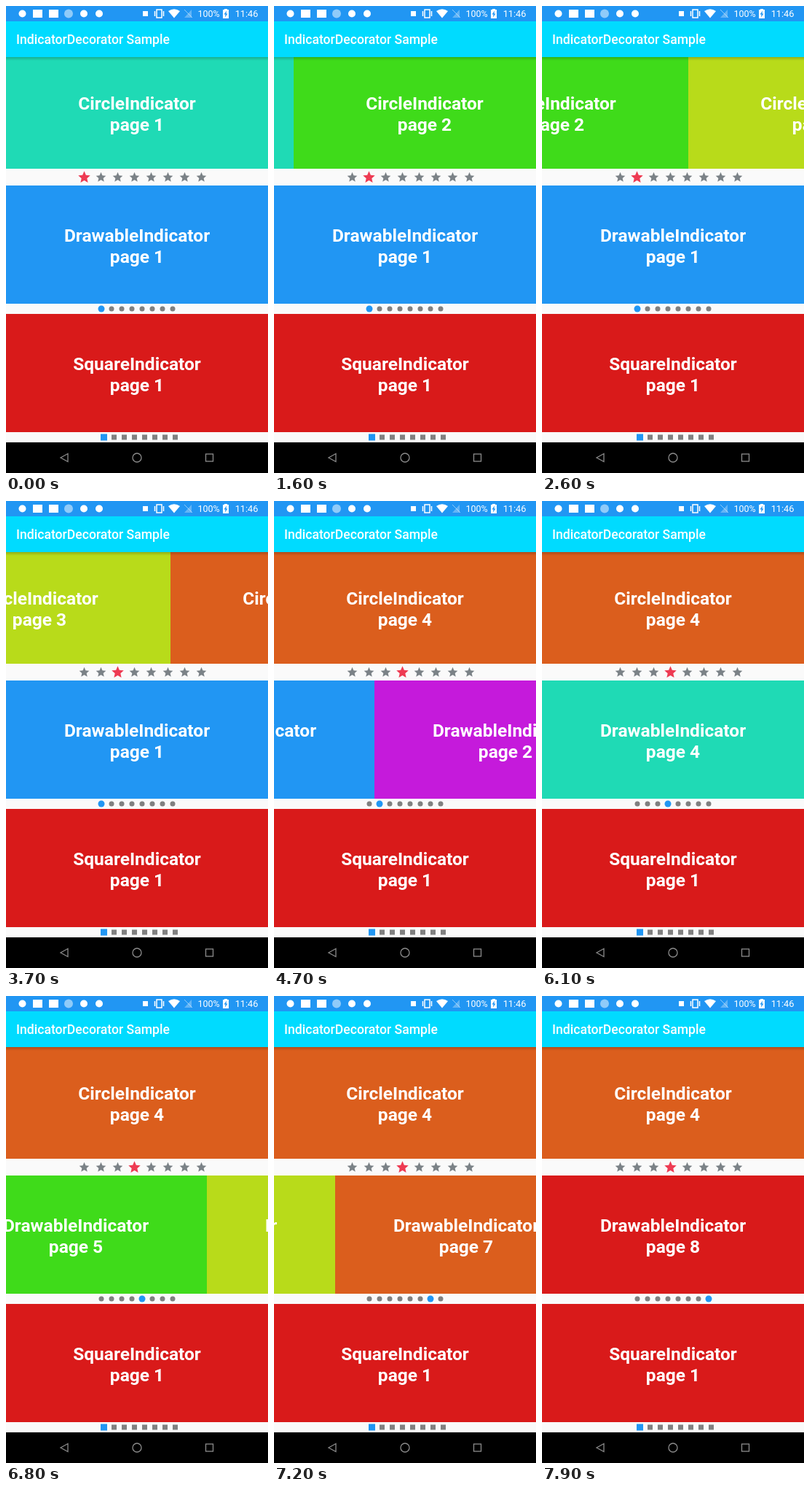
An HTML page with a canvas for the animation above (8000 ms loop, 360 by 640 pixels).

```html
<!DOCTYPE html>
<html lang="en">
<head>
<meta charset="utf-8">
<title>IndicatorDecorator Sample</title>
<style>
html, body { margin: 0; width: 100%; height: 100%; overflow: hidden; background: #000; }
canvas { display: block; }
</style>
</head>
<body>
<canvas id="stage" width="360" height="640"></canvas>
<script>
const ctx = document.getElementById('stage').getContext('2d');
const LOOP = 8000, WIDTH = 360;
const BLUE = '#2196f3', GREY = '#808080', STAR_GREY = '#7b8287', STAR_RED = '#ee3b53';
const PAGE_COLORS = [BLUE, '#c51adb', '#1d39d9', '#1fdab5', '#3fdb1a', '#b8db1a', '#db5e1d', '#d91a1a'];

// Each swipe is [start, duration] and moves its pager by one page.
const pagers = [
  { title: 'CircleIndicator', y: 70, h: 153, baseline: 142, firstColor: 3, mark: starMark,
    markX: 107.5, markY: 235, gap: 23, swipes: [[1324, 400], [2444, 500], [3564, 500]] },
  { title: 'DrawableIndicator', y: 246, h: 162, baseline: 322.5, firstColor: 0, mark: dotMark,
    markX: 131, markY: 415, gap: 14,
    swipes: [[4490, 500], [5084, 500], [5640, 480], [6190, 480], [6724, 400], [7000, 380], [7270, 390]] },
  { title: 'SquareIndicator', y: 422, h: 162, baseline: 498.5, firstColor: 7, mark: squareMark,
    markX: 134.5, markY: 591, gap: 14, swipes: [] }
];

const clamp = v => Math.max(0, Math.min(1, v));
const fling = u => 1 - (1 - clamp(u) ** 1.5) ** 3;
const scrollAt = (swipes, t) =>
  swipes.reduce((sum, [start, length]) => sum + fling((t - start) / length), 0);

function rect(x, y, w, h, color) {
  ctx.fillStyle = color;
  ctx.fillRect(x, y, w, h);
}

function circle(x, y, r, color) {
  ctx.fillStyle = color;
  ctx.beginPath();
  ctx.arc(x, y, r, 0, Math.PI * 2);
  ctx.fill();
}

function polygon(points, color, outlined) {
  ctx.beginPath();
  points.forEach(([x, y]) => ctx.lineTo(x, y));
  ctx.closePath();
  ctx.fillStyle = ctx.strokeStyle = color;
  outlined ? ctx.stroke() : ctx.fill();
}

function line(x1, y1, x2, y2) {
  ctx.beginPath();
  ctx.moveTo(x1, y1);
  ctx.lineTo(x2, y2);
  ctx.stroke();
}

function text(value, x, y, font, align = 'left') {
  ctx.font = font + ' Roboto, sans-serif';
  ctx.textAlign = align;
  ctx.fillStyle = '#fff';
  ctx.fillText(value, x, y);
}

function starMark(x, y, selected) {
  const radius = selected ? 8.7 : 7.2;
  const points = Array.from({ length: 10 }, (_, i) => {
    const angle = i * Math.PI / 5 - Math.PI / 2;
    const r = i % 2 ? radius * 0.46 : radius;
    return [x + r * Math.cos(angle), y + r * Math.sin(angle)];
  });
  polygon(points, selected ? STAR_RED : STAR_GREY);
}

function dotMark(x, y, selected) {
  circle(x, y, selected ? 4.5 : 3.5, selected ? BLUE : GREY);
}

function squareMark(x, y, selected) {
  const size = selected ? 9 : 7;
  rect(x - size / 2, y - size / 2, size, size, selected ? BLUE : GREY);
}

function drawPager(pager, t) {
  const scroll = scrollAt(pager.swipes, t);
  for (let i = 0; i < 8; i++) {
    const x = Math.round((i - scroll) * WIDTH);
    if (Math.abs(x) >= WIDTH) continue;
    rect(x, pager.y, WIDTH, pager.h, PAGE_COLORS[(pager.firstColor + i) % 8]);
    text(pager.title, x + 180, pager.baseline, 'bold 24.5px', 'center');
    text('page ' + (i + 1), x + 180, pager.baseline + 29, 'bold 24.5px', 'center');
  }
  for (let i = 0; i < 8; i++) {
    pager.mark(pager.markX + i * pager.gap, pager.markY, i === Math.round(scroll));
  }
}

function drawStatusBar() {
  const white = '#fff', faint = 'rgba(255,255,255,.5)';
  rect(0, 0, WIDTH, 21, BLUE);
  circle(22.5, 10.5, 5, white);
  rect(37, 5, 13, 11, white);
  rect(59, 5, 13, 11, white);
  circle(86, 10.5, 6, faint);
  circle(107, 10.5, 5, white);
  circle(128, 10.5, 5, white);
  rect(188, 7, 7, 7, white);

  // vibrating phone
  ctx.strokeStyle = white;
  ctx.lineWidth = 1.5;
  ctx.strokeRect(207, 5, 7, 11);
  line(204.5, 7, 204.5, 14);
  line(216.5, 7, 216.5, 14);

  // wireless fan
  ctx.fillStyle = white;
  ctx.beginPath();
  ctx.moveTo(231, 16.5);
  ctx.lineTo(223, 7);
  ctx.quadraticCurveTo(231, 1.5, 239, 7);
  ctx.fill();

  // missing signal
  polygon([[255, 5], [255, 16], [245, 16]], 'rgba(255,255,255,.3)');
  ctx.strokeStyle = faint;
  ctx.lineWidth = 1;
  line(245, 5, 256, 16);

  text('100%', 263.5, 15, '12.5px');
  rect(298, 5, 8, 12, white);
  rect(300, 4, 4, 1, white);
  polygon([[303, 6.5], [299.5, 11.5], [301.5, 11.5], [301, 15.5], [304.5, 10.5], [302.5, 10.5]], BLUE);
  text('11:46', 346.5, 15, '12.8px', 'right');
}

function drawAppBar() {
  rect(0, 21, WIDTH, 49, '#00dbff');
  const shadow = ctx.createLinearGradient(0, 70, 0, 75);
  shadow.addColorStop(0, 'rgba(0,0,0,.2)');
  shadow.addColorStop(1, 'rgba(0,0,0,0)');
  rect(0, 70, WIDTH, 5, shadow);
  text('IndicatorDecorator Sample', 14, 52, '500 17.6px');
}

function drawNavigation() {
  rect(0, 598, WIDTH, 42, '#000');
  ctx.lineWidth = 1.3;
  polygon([[75, 619], [85, 613.5], [85, 624.5]], '#8c8c8c', true);
  ctx.beginPath();
  ctx.arc(180, 619, 6, 0, Math.PI * 2);
  ctx.stroke();
  ctx.strokeRect(274.5, 614, 10, 10);
}

function draw(now) {
  rect(0, 0, WIDTH, 640, '#fafafa');
  pagers.forEach(pager => drawPager(pager, now % LOOP));
  drawStatusBar();
  drawAppBar();
  drawNavigation();
  requestAnimationFrame(draw);
}
requestAnimationFrame(draw);
</script>
</body>
</html>
```
